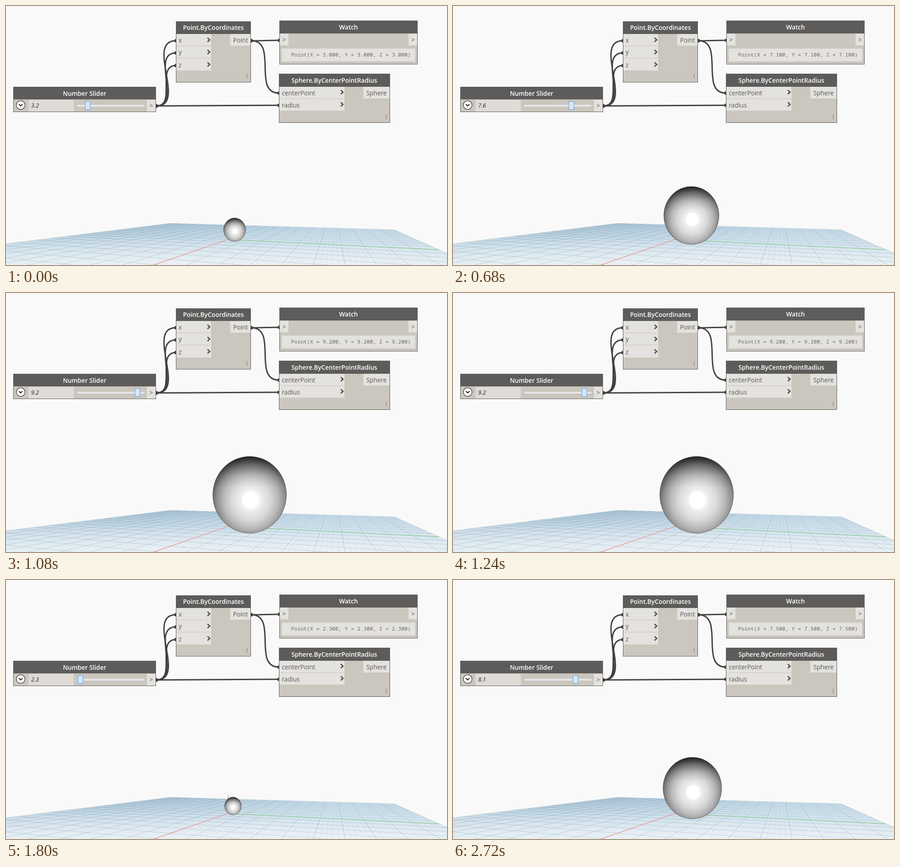
Recreate the animation shown at these times as an HTML page with a canvas. Size 976x574 px, loop 2800 ms.

```html
<!DOCTYPE html>
<html lang="en">
<head>
<meta charset="utf-8">
<title>Sphere driven by a number slider</title>
<style>
  html, body { margin: 0; width: 100%; height: 100%; overflow: hidden; background: #f9f9f9; }
  canvas, svg { position: absolute; left: 0; top: 0; display: block; }
  text { font: 13.7px "Open Sans", sans-serif; fill: #5a5856; }
  .title { font-weight: 600; fill: #fff; text-anchor: middle; }
  .mid { text-anchor: middle; }
  .num { font-size: 12.8px; font-style: italic; fill: #222; }
  .mono { font: 11.62px "Noto Sans Mono", "DejaVu Sans Mono", monospace; fill: #6a6865; }
  .body { fill: #cbc6be; stroke: #5e5c5a; }
  .head { fill: #5e5c5a; }
  .port { fill: #e4e2de; }
  .sep { stroke: #cbc6be; }
  .grip { stroke: #7d7a76; }
  .wire { fill: none; stroke: #424242; stroke-width: 3; }
  .dot { fill: #424242; }
  .chev { fill: none; stroke: #4a4846; stroke-width: 2.4; }
</style>
</head>
<body>
<canvas id="floor" width="976" height="574"></canvas>
<svg width="976" height="574" viewBox="0 0 976 574">
  <defs>
    <radialGradient id="ball" cx=".515" cy=".57" r=".58">
      <stop offset="0" stop-color="#fff"/>
      <stop offset=".18" stop-color="#fff"/>
      <stop offset=".23" stop-color="#efefef"/>
      <stop offset=".45" stop-color="#d9d9d9"/>
      <stop offset=".65" stop-color="#b6b6b6"/>
      <stop offset=".8" stop-color="#8e8e8e"/>
      <stop offset=".9" stop-color="#666"/>
      <stop offset="1" stop-color="#3a3a3a"/>
    </radialGradient>
    <linearGradient id="shade" x2="0" y2="1">
      <stop offset="0" stop-color="#000" stop-opacity=".5"/>
      <stop offset=".1" stop-color="#000" stop-opacity=".28"/>
      <stop offset=".25" stop-color="#000" stop-opacity=".08"/>
      <stop offset=".4" stop-color="#000" stop-opacity="0"/>
    </linearGradient>
    <path id="chev" class="chev" d="M-3 -4.5L2 0L-3 4.5"/>
  </defs>

  <ellipse class="sphere" fill="url(#ball)" stroke="#333" stroke-opacity=".6"/>
  <ellipse class="sphere" fill="url(#shade)"/>

  <g id="wires"></g>

  <g>
    <rect class="body" x="16.5" y="179.5" width="315" height="55"/>
    <rect class="head" x="16" y="179" width="316" height="28"/>
    <text class="title" x="174" y="198.5">Number Slider</text>
    <rect x="50" y="208" width="100" height="26" fill="#dfdcd7"/>
    <rect class="port" x="312" y="208" width="19" height="26"/>
    <circle cx="32.5" cy="219.5" r="9.6" fill="#fff" stroke="#3c3a38" stroke-width="1.3"/>
    <path d="M28.5 217.5L32.5 221.5L36.5 217.5" fill="none" stroke="#222" stroke-width="2"/>
    <text class="num" id="value" x="55.5" y="224.5"></text>
    <rect x="158" y="219" width="148" height="4" fill="#e5e7ea"/>
    <rect id="thumb" x="-5.5" y="211.5" width="11" height="18" fill="#d3e7fa" stroke="#5a9ee0"/>
    <text class="mid" x="321.5" y="225.5">&gt;</text>
  </g>

  <g>
    <rect class="body" x="376.5" y="34.5" width="165" height="134.5"/>
    <rect class="head" x="376" y="34" width="166" height="28"/>
    <text class="title" x="459" y="53">Point.ByCoordinates</text>
    <rect class="port" x="377" y="62" width="77" height="81"/>
    <rect class="port" x="496" y="62" width="45" height="26"/>
    <path class="sep" d="M377 88.5H454M377 115.5H454"/>
    <text x="382" y="80.5">x</text>
    <text x="382" y="107">y</text>
    <text x="382" y="135.5">z</text>
    <text class="mid" x="519" y="80.5">Point</text>
    <use href="#chev" x="449" y="75"/>
    <use href="#chev" x="449" y="102"/>
    <use href="#chev" x="449" y="129.5"/>
    <path class="grip" d="M533.5 151V161"/>
  </g>

  <g>
    <rect class="body" x="605.5" y="33" width="305" height="96"/>
    <rect class="head" x="605" y="32.5" width="306" height="28.5"/>
    <text class="title" x="758" y="52">Watch</text>
    <rect class="port" x="606" y="61" width="19" height="26"/>
    <rect class="port" x="891" y="61" width="19" height="26"/>
    <rect x="610.5" y="94.5" width="295" height="28" fill="#e4e2de" stroke="#d9d6d0"/>
    <text class="mid" x="615.5" y="79.5">&gt;</text>
    <text class="mid" x="901" y="79.5">&gt;</text>
    <text class="mono" id="watch" x="631" y="111.5"></text>
  </g>

  <g>
    <rect class="body" x="604.5" y="150.5" width="245" height="108"/>
    <rect class="head" x="604" y="150" width="246" height="29"/>
    <text class="title" x="726.5" y="169.5">Sphere.ByCenterPointRadius</text>
    <rect class="port" x="605" y="179" width="144" height="53"/>
    <rect class="port" x="791" y="179" width="58" height="26"/>
    <path class="sep" d="M605 205.5H749"/>
    <text x="610.5" y="197.5">centerPoint</text>
    <text x="610.5" y="224.5">radius</text>
    <text class="mid" x="820" y="197.5">Sphere</text>
    <use href="#chev" x="744" y="191"/>
    <use href="#chev" x="744" y="218"/>
    <path class="grip" d="M841.5 241V251"/>
  </g>
</svg>
<script>
const $ = id => document.getElementById(id);

// Connectors
const links = [
  [333, 221.5, 376, 77], [333, 221.5, 376, 104], [333, 221.5, 376, 132],
  [333, 221.5, 604, 220], [543, 77, 605, 76], [543, 77, 604, 193]
];
$('wires').innerHTML = links.map(([x, y, X, Y]) => {
  const k = 0.45 * Math.hypot(X - x, Y - y);
  return `<path class="wire" d="M${x} ${y}C${x + k} ${y} ${X - k} ${Y} ${X} ${Y}"/>` +
    `<circle class="dot" cx="${x}" cy="${y}" r="3.8"/><circle class="dot" cx="${X}" cy="${Y}" r="3.8"/>`;
}).join('');

// Ground plane in perspective, spanned by an origin and two vanishing points
const HALF = 50, DEPTH = 0.583, SPREAD = 0.2215;
const O = [491, 517.5], BACK = [726, 436.5], SIDE = [-1150, 437.5];
const project = (u, v) => {
  const a = u * DEPTH / HALF, b = v * SPREAD / HALF, w = 1 + a + b;
  return [0, 1].map(i => (O[i] + a * BACK[i] + b * SIDE[i]) / w);
};
const ctx = $('floor').getContext('2d');

function line(p, q, color, width) {
  ctx.strokeStyle = color;
  ctx.lineWidth = width;
  ctx.beginPath();
  ctx.moveTo(...p);
  ctx.lineTo(...q);
  ctx.stroke();
}

function drawFloor() {
  const fill = ctx.createLinearGradient(0, 481, 0, 574);
  [[0, '#cbdfeb'], [0.25, '#d8e8f1'], [0.6, '#e6f0f6'], [1, '#f2f7fa']]
    .forEach(([at, color]) => fill.addColorStop(at, color));
  ctx.fillStyle = fill;
  ctx.beginPath();
  [[HALF, HALF], [HALF, -HALF], [-HALF, -HALF], [-HALF, HALF]]
    .forEach(c => ctx.lineTo(...project(...c)));
  ctx.fill();
  for (let i = -HALF; i <= HALF; i++) {
    const [rgb, alpha, width] = i % 5 ? ['115,155,185', 0.24, 0.6] : ['90,125,150', 0.4, 0.9];
    // Cross lines crowd together with depth, so they get fainter
    const fade = Math.min(1, (1 + i * DEPTH / HALF) ** -2);
    line(project(i, -HALF), project(i, HALF), `rgba(${rgb},${alpha * fade})`, width);
    line(project(-HALF, i), project(HALF, i), `rgba(${rgb},${alpha})`, width);
  }
  line(O, project(-HALF, 0), '#f08a86', 1.3);
  line(O, project(0, -HALF), '#93cb9b', 1.3);
  line([491.5, 517], [491.5, 477], '#7d90a6', 1.2);
}

// Smooth curve through [time, value] points that never overshoots
function curve(points) {
  const rate = points.slice(1).map(([t, v], i) => (v - points[i][1]) / (t - points[i][0]));
  const slope = points.map((_, i) => {
    const a = rate[i - 1] ?? rate[i], b = rate[i] ?? a;
    return a * b > 0 ? 2 * a * b / (a + b) : 0;
  });
  return t => {
    let i = 0;
    while (i < points.length - 2 && t >= points[i + 1][0]) i++;
    const [t0, v0] = points[i], [t1, v1] = points[i + 1];
    const h = t1 - t0, x = Math.min(1, (t - t0) / h), y = 1 - x;
    return v0 * y * y * (1 + 2 * x) + v1 * x * x * (3 - 2 * x) +
      h * x * y * (slope[i] * y - slope[i + 1] * x);
  };
}

const slider = curve([[0, 3.2], [680, 7.6], [1040, 9.2], [1260, 9.2],
  [1720, 2.3], [1810, 2.3], [2320, 5.8], [2720, 8.1]]);
const radius = curve([[0, 3], [680, 7.1], [1080, 9.2], [1290, 9.2],
  [1790, 2.3], [1850, 2.3], [2320, 4.3], [2720, 7.5]]);

const LOOP = 2800, STEP = 80;
const hold = t => {
  const from = t < 600 ? 0 : t < 1840 ? 600 : 1840;
  return from + Math.floor((t - from) / STEP) * STEP;
};
const balls = document.querySelectorAll('.sphere');
let last = -1;

function show(t) {
  const s = slider(t).toFixed(1), r = radius(t).toFixed(1), n = +r;
  $('value').textContent = s;
  $('thumb').setAttribute('transform', `translate(${Math.round(164.5 + 18.4 * (s - 2.3))} 0)`);
  $('watch').textContent = `Point(X = ${r}00, Y = ${r}00, Z = ${r}00)`;
  const top = 517.5 - n * (15.4 + 0.16 * n), bottom = 516.5 + 1.7 * n;
  const box = {
    cx: 491 + n * (4.87 + 0.04 * n), cy: (top + bottom) / 2,
    rx: n * (7.75 + 0.12 * n), ry: (bottom - top) / 2
  };
  for (const ball of balls)
    for (const key in box) ball.setAttribute(key, box[key].toFixed(2));
}

function tick() {
  const t = hold(performance.now() % LOOP);
  if (t !== last) show(last = t);
  requestAnimationFrame(tick);
}

drawFloor();
tick();
</script>
</body>
</html>
```
